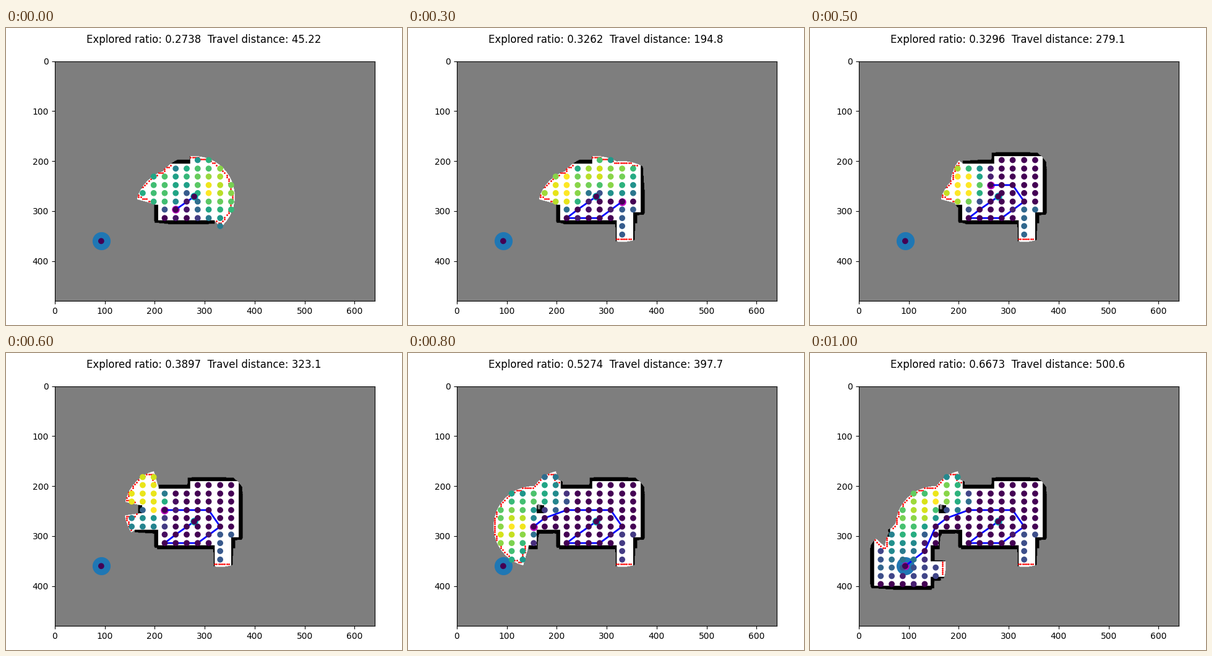
These frames come from a looping animation (640x480 px, 1.1 s). A matplotlib script:

```python
import numpy as np
import matplotlib.pyplot as plt
from matplotlib.animation import FuncAnimation

W, H = 640, 480
WALL, UNKNOWN, FREE = 1, 127, 255
SENSOR, VIEW, DEPTH, CELL = 80, 70, 8, 4
STEP = 0.5

# Floor plan as x0, y0, x1, y1
ROOMS = [(207, 206, 353, 319), (271, 191, 368, 303), (320, 300, 353, 440),
         (63, 100, 208, 288), (63, 100, 160, 319), (31, 302, 144, 400),
         (144, 351, 200, 382)]
PILLARS = [(160, 239, 175, 255), (83, 347, 87, 351)]

START, GOAL = (279, 271), (93, 360)
GRID_X = np.rint(np.linspace(0, W - 1, 30)).astype(int)
GRID_Y = np.rint(np.linspace(0, H - 1, 30)).astype(int)

# Robot moves in grid steps, from the first node reached
FIRST = (11, 18)
MOVES = [(-1, 1), (3, 0), (2, -2), (-1, -2), (-2, 0), (-2, 0),
         (-2, 1), (-1, 1), (-1, 3)]
RATIOS = [.2738, .2738, .2776, .3262, .3279, .3296,
          .3897, .4715, .5274, .6165, .6673]


def build_plan():
    plan = np.full((H, W), WALL, np.uint8)
    for rects, value in ((ROOMS, FREE), (PILLARS, WALL)):
        for x0, y0, x1, y1 in rects:
            plan[y0:y1, x0:x1] = value
    return plan


def scan(plan, belief, pos):
    """Cast rays from pos; each one sinks a little way into the wall it hits."""
    a = np.radians(np.arange(0, 360, 0.2))[:, None]
    r = np.arange(0, SENSOR + STEP, STEP)
    x = np.rint(pos[0] + r * np.cos(a)).astype(int)
    y = np.rint(pos[1] + r * np.sin(a)).astype(int)
    solid = plan[y, x] == WALL
    sunk = np.cumsum(solid, axis=1) * STEP
    left = np.logical_or.accumulate(~solid & (sunk > 0), axis=1)
    seen = (sunk <= DEPTH) & ~left
    belief[y[seen], x[seen]] = plan[y[seen], x[seen]]


def find_frontier(belief):
    """Coarse free cells that touch unknown space."""
    h, w = H // CELL, W // CELL
    coarse = belief.reshape(h, CELL, w, CELL).min(axis=(1, 3))
    pad = np.pad((coarse == UNKNOWN).astype(int), 1)
    near = sum(pad[i:i + h, j:j + w] for i in range(3) for j in range(3)
               if (i, j) != (1, 1))
    y, x = np.nonzero((coarse == FREE) & (near > 1) & (near < 8))
    return np.column_stack([x, y]) * CELL


def utility(belief, node, frontier):
    """Number of frontier points in range and in plain sight of the node."""
    node = np.asarray(node)
    pts = frontier[np.hypot(*(frontier - node).T) < VIEW]
    if not len(pts):
        return 0
    t = np.linspace(0, 1, VIEW + 1)[None, :-1, None]
    ray = np.rint(node + t * (pts - node)[:, None, :]).astype(int)
    return int((belief[ray[..., 1], ray[..., 0]] == FREE).all(axis=1).sum())


def explore():
    plan = build_plan()
    belief = np.full((H, W), UNKNOWN, np.uint8)
    grid = [(int(x), int(y)) for x in GRID_X for y in GRID_Y]
    cells = np.cumsum([FIRST] + MOVES, axis=0)
    stops = [(int(GRID_X[i]), int(GRID_Y[j])) for i, j in cells] + [GOAL]
    scan(plan, belief, START)
    path, travel, states = [START], 0.0, []
    for stop, ratio in zip(stops, RATIOS):
        travel += np.hypot(stop[0] - path[-1][0], stop[1] - path[-1][1])
        path.append(stop)
        scan(plan, belief, stop)
        frontier = find_frontier(belief)
        nodes = [p for p in grid if belief[p[1], p[0]] == FREE] + [START, GOAL]
        done = set(path) | {GOAL}
        values = [0 if p in done else utility(belief, p, frontier) for p in nodes]
        text = f"Explored ratio: {ratio:.4g}  Travel distance: {travel:.4g}"
        states.append((belief.copy(), frontier, np.array(nodes),
                       np.array(values, float), np.array(path), text))
    return states


states = explore()

fig, ax = plt.subplots(figsize=(6.4, 4.8), dpi=100)
image = ax.imshow(states[0][0], cmap="gray", vmin=WALL, vmax=FREE)
edge_dots = ax.scatter([], [], c="r", s=1, zorder=1)
ax.plot(*GOAL, "o", color="C0", markersize=20, zorder=2)
robot, = ax.plot([], [], "mo", markersize=8, zorder=3)
trail, = ax.plot([], [], "b", linewidth=2, zorder=3)
ax.plot(*START, "co", markersize=8, zorder=3)
node_dots = ax.scatter([0], [0], c=[0.0], cmap="viridis", zorder=4)
title = fig.suptitle("")
ax.axis((0, W, H, 0))


def draw(i):
    belief, frontier, nodes, values, path, text = states[i]
    image.set_data(belief)
    edge_dots.set_offsets(frontier)
    node_dots.set_offsets(nodes)
    node_dots.set_array(values)
    node_dots.set_clim(0, max(values.max(), 1))
    trail.set_data(path[:, 0], path[:, 1])
    robot.set_data(path[-1:, 0], path[-1:, 1])
    title.set_text(text)
    return image, edge_dots, node_dots, trail, robot, title


draw(0)
fig.tight_layout()
anim = FuncAnimation(fig, draw, frames=len(states), interval=100,
                     repeat=True, repeat_delay=0, blit=False)
plt.show()
```
